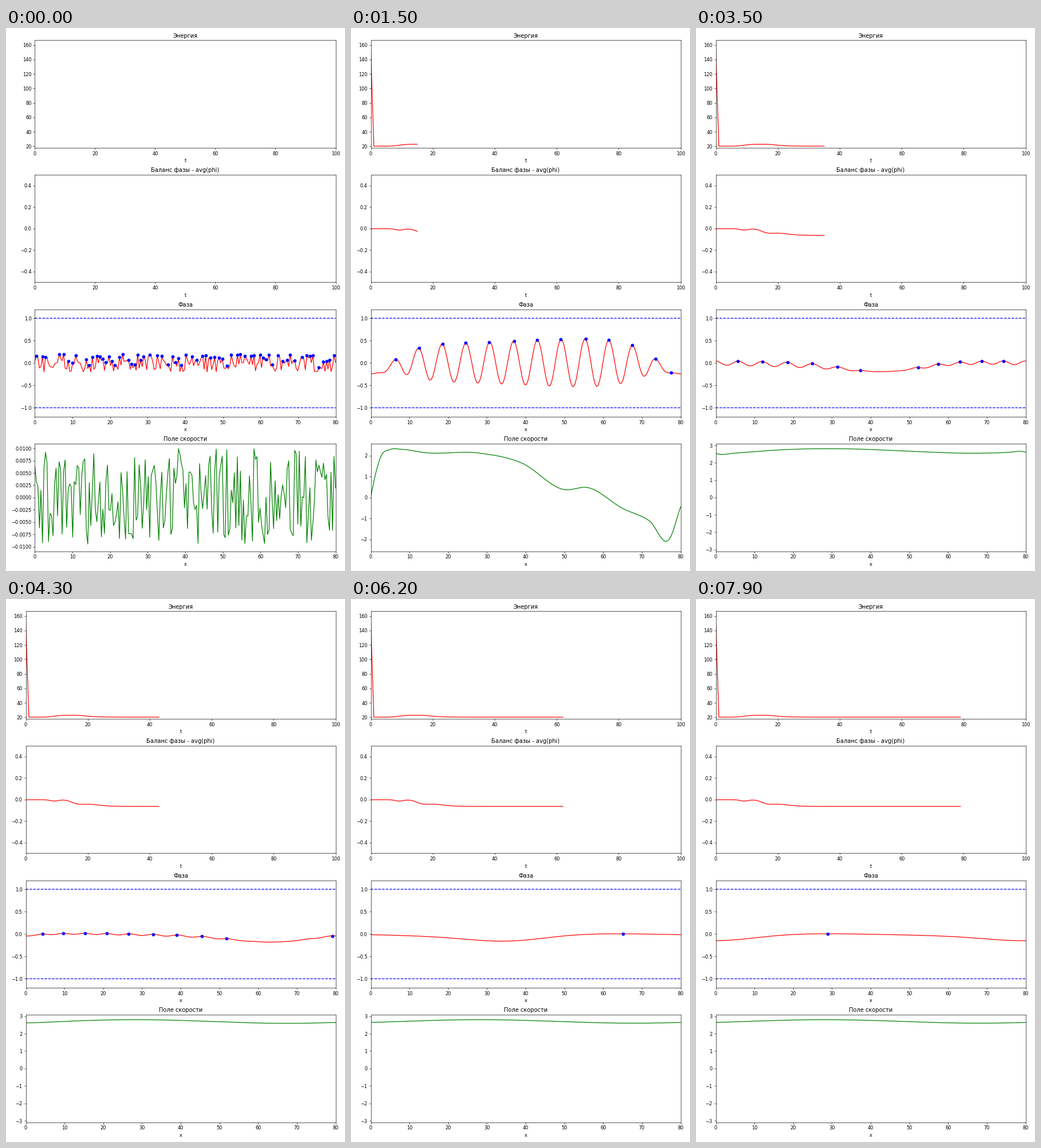
Animation, 592 px wide and 947 px high, one loop 8 s. Source, as a matplotlib script:

```python
import numpy as np
import matplotlib.pyplot as plt
from matplotlib.animation import FuncAnimation

W, H, DPI = 592, 947, 59.2
FRAMES, STEP_MS = 80, 100
L, N, WAVES = 80, 200, 13
x = np.linspace(0, L, N)
ts = np.arange(FRAMES)
rng = np.random.default_rng(7)


def curve(at, *points):
    """Cubic Hermite curve through a few points."""
    xs, ys = np.array(points, float).T
    m = np.gradient(ys, xs)
    k = np.clip(np.searchsorted(xs, at, side="right") - 1, 0, len(xs) - 2)
    h = xs[k + 1] - xs[k]
    u = (at - xs[k]) / h
    return ((1 + 2 * u) * (1 - u) ** 2 * ys[k] + u * (1 - u) ** 2 * h * m[k]
            + u * u * (3 - 2 * u) * ys[k + 1] - u * u * (1 - u) * h * m[k + 1])


def sigmoid(z):
    return 1 / (1 + np.exp(-z))


def bump(z):
    return np.exp(-z * z)


def ease(u):
    u = np.clip(u, 0, 1)
    return u * u * (3 - 2 * u)


# --- time series -----------------------------------------------------------
fall = 1 + (np.maximum(ts - 15, 0) / 5) ** 3
energy = 20.2 + 2.7 * sigmoid((ts - 9.2) / 1.15) / fall
energy[0] = 151.7
balance = (-.002 - .045 * sigmoid((ts - 14.8) / .9)
           - .0165 * sigmoid((ts - 24.5) / 1.8)
           - .013 * bump((ts - 9.2) / 1.7) + .005 * bump((ts - 20.5) / 2.5))

# --- phase: short waves drifting together with a slow dip ------------------
drift = curve(ts, (0, 3.5), (10, 4.8), (15, 6.1), (27, 29.95), (35, 50.05),
              (51, 92.45), (80, 170))
level = np.exp(curve(ts, (0, -3.8), (10, -.92), (15, -.69), (20, -1.1),
                     (27, -1.86), (35, -3.1), (51, -5.4), (80, -11)))


def phase(t):
    s = np.linspace(0, WAVES, 900, endpoint=False)
    theta = 2 * np.pi * s / WAVES
    late, age = ease((t - 15) / 20), max(t - 15, 0)
    delta = theta - 2 * np.pi * (12 - .3 * late) / WAVES
    well = np.cos(delta) - 1

    depth = (.14 + .115 * np.exp(-age / 30)) * sigmoid((t - 11) / 1.2)
    sharp = 1.5 + 9 * np.exp(-age / 6)
    slow = .005 - depth * np.exp(sharp * well) + .018 * late * np.sin(delta)

    gap = min(t / 10, 1) * np.exp(3 * well)
    amp = level[t] * (1 - gap) * (1 - (.1 + .15 * late) * np.sin(delta))

    at = L * s / WAVES + drift[t] + 1.2 * late * np.cos(theta)
    return np.interp(x, at, slow + amp * np.cos(2 * np.pi * s), period=L)


# --- velocity --------------------------------------------------------------
v_grown = curve(x, (0, .03), (1, .95), (2.5, 1.93), (5, 2.31), (8, 2.32),
                (14, 2.16), (28, 2.14), (39, 1.66), (50, .38), (56, .48),
                (65, -.52), (72, -1.13), (77.2, -1.98), (80, -.45))
v_mixed = curve(x, (0, 2.05), (1, 1.75), (5, 2), (18, 2.72), (33, 2.9),
                (50, 2.6), (66, 2.33), (76, 2.58), (79, 2.79), (80, 2.48))
v_final = 2.7 + .1 * np.cos(2 * np.pi * (x - 28) / L)


def velocity(t):
    if t <= 15:
        return v_grown * sigmoid((t - 9.3) / 1.2)
    if t <= 27:  # the fast side sweeps rightwards
        u = np.clip(1.6 * (t - 15) / 12 - .6 * x / L, 0, 1)
        return v_grown + (v_mixed - v_grown) * u
    return v_final + (v_mixed - v_final) * np.exp(-(t - 27) / 4.5)


phases = [rng.uniform(-.2, .2, N)] + [phase(t) for t in ts[1:]]
speeds = [rng.uniform(-.01, .01, N)] + [velocity(t) for t in ts[1:]]

# --- figure ----------------------------------------------------------------
fig, axes = plt.subplots(4, 1, figsize=(W / DPI, (H + .05) / DPI), dpi=DPI)
titles = ["Энергия", "Баланс фазы - avg(phi)", "Фаза", "Поле скорости"]
for ax, title, label, right in zip(axes, titles, "ttxx", (100, 100, L, L)):
    ax.set_title(title)
    ax.set_xlabel(label)
    ax.set_xlim(0, right)
ax_e, ax_b, ax_p, ax_v = axes
ax_e.set_ylim(18, 166.4)
ax_b.set_ylim(-.5, .5)
ax_p.set_ylim(-1.2, 1.2)

line_e, = ax_e.plot([], [], "r")
line_b, = ax_b.plot([], [], "r")
line_p, = ax_p.plot([], [], "r")
dots, = ax_p.plot([], [], "bo")
for y in (-1, 1):
    ax_p.axhline(y, color="b", ls="--", snap=False)
line_v, = ax_v.plot([], [], "g")


def place(left, right=575.5, height=187.4, pitch=234.55):
    for row, ax in enumerate(axes):
        bottom = 208.9 + pitch * row
        ax.set_position([left / W, 1 - bottom / H, (right - left) / W, height / H])


def draw(t):
    phi, v = phases[t], speeds[t]
    line_e.set_data(ts[:t + 1], energy[:t + 1])
    line_b.set_data(ts[:t + 1], balance[:t + 1])
    line_p.set_data(x, phi)
    peak = 1 + np.flatnonzero((phi[1:-1] > phi[:-2]) & (phi[1:-1] > phi[2:]))
    dots.set_data(x[peak], phi[peak])
    line_v.set_data(x, v)
    top = 1.1 * np.abs(v).max()
    ax_v.set_ylim(-top, top)
    # wide tick labels push every panel to the right
    widest = max(len(s.get_text()) for s in ax_v.get_yticklabels())
    place(34.5 + 5.33 * max(0, widest - 4))
    return line_e, line_b, line_p, dots, line_v


place(50.5)
anim = FuncAnimation(fig, draw, frames=FRAMES, interval=STEP_MS,
                     repeat=True, repeat_delay=0, blit=False)
plt.show()
```
